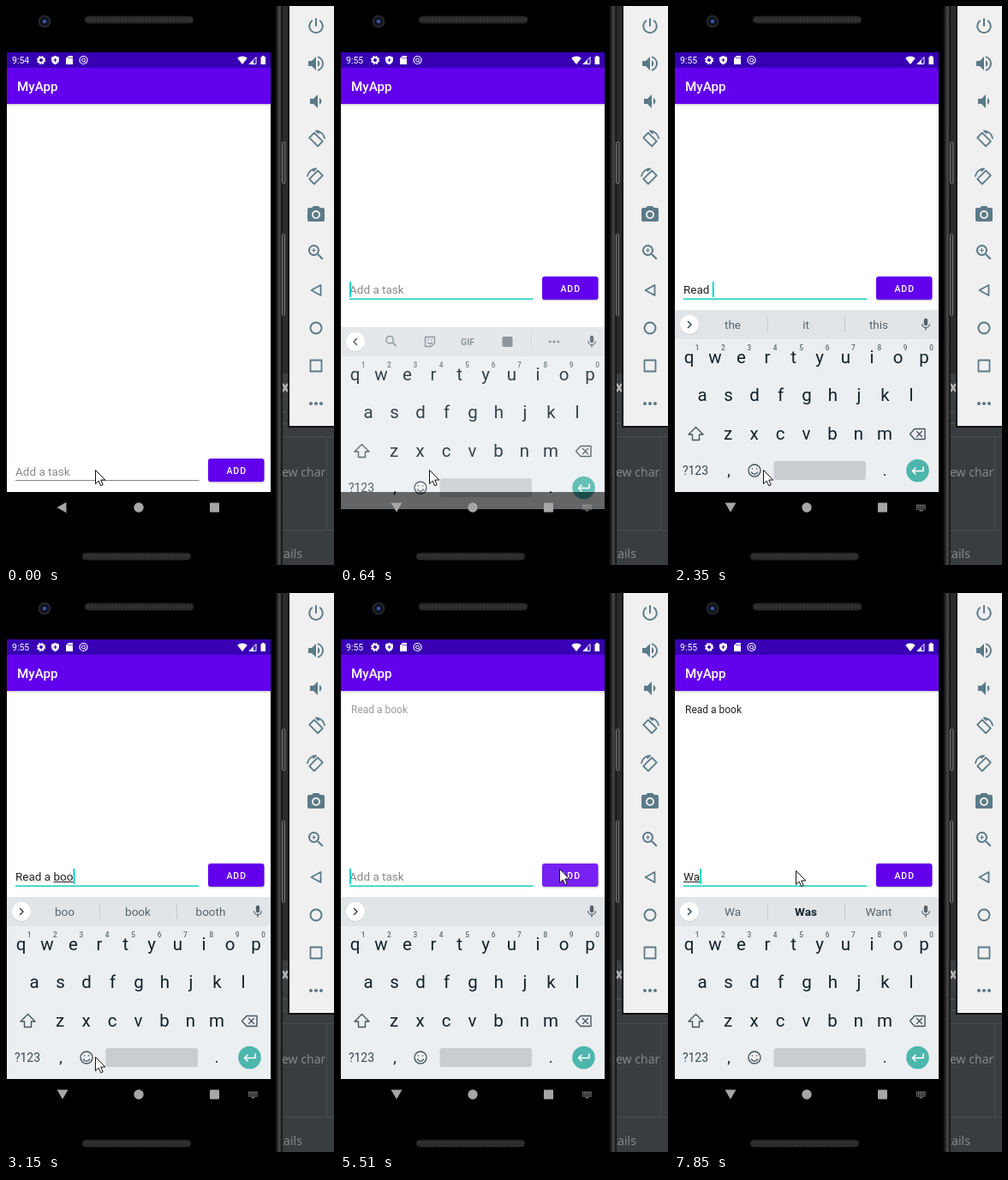
Write an HTML page that moves like this. It is 383 by 651 pixels and loops after 8000 ms.

```html
<!DOCTYPE html>
<html lang="en">
<head>
<meta charset="utf-8">
<title>Task list</title>
<style>
html, body { margin: 0; width: 100%; height: 100%; overflow: hidden; background: #000; }
svg { display: block; width: 383px; height: 651px; }
text { font-family: Roboto, sans-serif; white-space: pre; }
.mid { text-anchor: middle; }
.line { fill: none; stroke-linecap: round; stroke-linejoin: round; }
</style>
</head>
<body>
<svg id="stage" viewBox="0 0 383 651" xmlns="http://www.w3.org/2000/svg">
  <defs>
    <linearGradient id="edge">
      <stop offset="0" stop-color="#000"/><stop offset=".3" stop-color="#222"/>
      <stop offset=".6" stop-color="#4a4a4a"/><stop offset=".8" stop-color="#2a2a2a"/><stop offset="1" stop-color="#080808"/>
    </linearGradient>
    <linearGradient id="drop" x2="0" y2="1">
      <stop offset="0" stop-color="#000" stop-opacity=".2"/><stop offset="1" stop-color="#000" stop-opacity="0"/>
    </linearGradient>
    <pattern id="mesh" width="4" height="4" patternUnits="userSpaceOnUse">
      <rect width="4" height="4" fill="#303030"/><circle cx="2" cy="2" r="1" fill="#202020"/>
    </pattern>
    <clipPath id="screen"><rect x="1" y="54" width="308" height="548"/></clipPath>
  </defs>

  <!-- editor window behind the phone -->
  <rect width="383" height="651" fill="#2b2b2b"/>
  <rect x="316" y="428" width="15" height="34" fill="#3c3f41"/>
  <rect x="316" y="462" width="67" height="189" fill="#3a3d3f"/>
  <path d="M316 501.500H383M316 610.500H383M374.500 501V610" stroke="#4b4e50" fill="none"/>
  <path d="M323 440l6 9M329 440l-6 9" stroke="#b4b4b4" stroke-width="2.500"/>
  <path d="M323 473h5M323 486h5" stroke="#565a5c"/>
  <g fill="#85898b" font-size="14">
    <text x="322" y="548" style="font-family:'Noto Sans',sans-serif">ew char</text>
    <text x="319" y="643" style="font-family:'Noto Sans',sans-serif">tails</text>
  </g>

  <!-- phone body -->
  <rect width="317" height="651" fill="#000"/>
  <rect x="314" width="9" height="651" fill="url(#edge)"/>
  <g fill="#333" stroke="#777"><rect x="322.500" y="158.500" width="3.500" height="48" rx="1"/><rect x="322.500" y="265.500" width="3" height="95" rx="1"/></g>
  <rect x="92" y="12" width="127" height="8" rx="4" fill="url(#mesh)" stroke="#1c1c1c"/>
  <rect x="89" y="637" width="127" height="8" rx="4" fill="url(#mesh)" stroke="#1c1c1c"/>
  <circle cx="45" cy="18" r="7.500" fill="#22242a"/><circle cx="45" cy="18" r="5" fill="#10131c"/><circle cx="45" cy="18" r="2.300" fill="#3c54a0"/>

  <!-- emulator tools -->
  <rect x="329" width="54" height="491" fill="#111"/>
  <rect x="331" width="52" height="489" fill="#f0f0f0"/>
  <g id="tools" fill="#5b7a88"></g>

  <g clip-path="url(#screen)">
    <rect x="1" y="54" width="308" height="512" fill="#fff"/>
    <text id="item" x="13" y="140" font-size="12" fill="#212121">Read a book</text>
    <rect x="1" y="114" width="308" height="3" fill="url(#drop)"/>
    <rect x="1" y="54" width="308" height="18" fill="#3700b3"/>
    <rect x="1" y="72" width="308" height="42" fill="#6200ee"/>
    <text x="13" y="98.500" font-size="15.200" font-weight="500" fill="#fff">MyApp</text>
    <g fill="#fff">
      <text id="clock" x="7" y="67" font-size="10.500"></text>
      <circle cx="41" cy="63" r="3" fill="none" stroke="#fff" stroke-width="2"/>
      <circle cx="41" cy="63" r="4.400" fill="none" stroke="#fff" stroke-width="1.400" stroke-dasharray="2 1.460"/>
      <path d="M57.500 58l4.500 1.800v3c0 2.600-2 4.600-4.500 5.400c-2.500-.8-4.500-2.800-4.500-5.400v-3z"/>
      <path d="M55.500 63h4M57.500 61v4" stroke="#3700b3"/>
      <path d="M73 58h5v10h-8v-7z"/><path d="M73 59.500v2M75 59.500v2M77 59.500v2" stroke="#3700b3" stroke-width=".8"/>
      <circle cx="90.500" cy="63" r="4.500" fill="none" stroke="#fff" stroke-width="1.200"/>
      <circle cx="90.500" cy="63" r="2" fill="none" stroke="#fff"/><path d="M91 64l3 3" stroke="#fff"/>
      <path d="M276 68l-5.800-7.300a9 9 0 0 1 11.600 0z"/>
      <path d="M284 67.500l8-8v8z" fill="none" stroke="#fff"/><path d="M284 68l5-5v5z"/>
      <path d="M299 58h2.500v1.200h1.500V68h-5.500V59.200h1.500z"/>
    </g>

    <g id="entry">
      <rect id="rule" x="11" width="214.500"/>
      <text id="hint" x="11" y="547" font-size="13.500" fill="#8a8a8a">Add a task</text>
      <text id="typed" x="11" y="547" font-size="13.500" fill="#212121"></text>
      <rect id="compose" y="548" height="1" fill="#212121"/>
      <rect id="caret" y="533" width="2" height="18" fill="#03dac5"/>
      <rect x="236" y="528.500" width="66" height="27" rx="3" fill="#000" opacity=".18"/>
      <rect x="236" y="527" width="65.500" height="27" rx="3" id="button"/>
      <text class="mid" x="269.200" y="544.600" font-size="10.500" font-weight="500" letter-spacing=".95" fill="#fff">ADD</text>
    </g>

    <rect x="1" y="566" width="308" height="36" fill="#000"/>
    <g id="keyboard">
      <rect x="1" y="354" width="308" height="212" fill="#eceff1"/>
      <rect x="1" y="354" width="308" height="34" fill="#e1e5e8"/>
      <circle cx="18" cy="371.800" r="11.300" fill="#c9ced1"/><circle cx="18" cy="371" r="11" fill="#fff"/>
      <path id="chevron" class="line" stroke="#37474f" stroke-width="1.500"/>
      <g id="mic" fill="#546069"></g>
      <g id="shortcuts" fill="#7b868c"></g>
      <g id="words" font-size="13.500" fill="#56636a">
        <path d="M109.500 362v18M199.500 362v18" stroke="#c6cbce"/>
        <text class="mid" x="68.500" y="376"></text><text class="mid" x="154" y="376"></text><text class="mid" x="239" y="376"></text>
      </g>
      <g id="keys" fill="#11212a"></g>
      <g class="line" stroke="#46545c" stroke-width="1.400">
        <path d="M25.500 490.500l8.500 8.500h-4.500v6.500h-8V499h-4.500z"/>
        <path d="M281 492.500h12v12h-12l-5.500-6zM283.500 495.500l6 6M289.500 495.500l-6 6"/>
        <circle cx="94" cy="541" r="7"/><path d="M90.500 543a3.800 3.800 0 0 0 7 0M91.500 538.700v.2M96.500 538.700v.2" />
      </g>
      <rect x="116.500" y="530" width="107.500" height="22" rx="3" fill="#c9cdd0"/>
      <circle cx="284.500" cy="541" r="13.300" fill="#4db6ac"/>
      <path class="line" d="M291 537v4.500H278.500M282 538l-3.500 3.500 3.500 3.500" stroke="#fff" stroke-width="1.600"/>
    </g>
    <rect id="scrim" x="1" y="566" width="308" height="36" fill="#000"/>
    <g fill="#a6a6a6">
      <path id="back"/><circle cx="155" cy="584" r="5.700"/><rect x="238" y="578.500" width="11" height="11" rx=".8"/>
      <g id="imeIcon"><path d="M283 581.500h11M283 583.700h11M283 585.900h11" stroke="#a6a6a6" stroke-width="1.300" stroke-dasharray="1.300 .6"/><path d="M286.500 587.800h4" stroke="#a6a6a6"/></g>
    </g>
  </g>
  <path id="pointer" d="M.5 .5V16.500L4.200 13 6.700 18.700 9.200 17.600 6.800 12H11.800Z" fill="#fff" stroke="#111" stroke-linejoin="round"/>
</svg>
<script>
const $ = id => document.getElementById(id);
const set = (id, attrs) => { for (const k in attrs) $(id).setAttribute(k, attrs[k]); };
const show = (id, on) => { $(id).style.display = on ? '' : 'none'; };

const SPEAKER = 'v6h4l5 5V4L';
const LENS = 'M15.500 14h-.79l-.28-.27A6.500 6.500 0 1 0 13.730 14.430l.27.280v.79l5 4.990L20.490 19zM9.500 14a4.500 4.500 0 1 1 0-9a4.500 4.500 0 0 1 0 9z';
const MIC = 'M12 14a3 3 0 0 0 3-3V5a3 3 0 0 0-6 0v6a3 3 0 0 0 3 3zm5.300-3a5.300 5.100 0 0 1-10.600 0H5c0 3.410 2.720 6.230 6 6.720V21h2v-3.280c3.280-.48 6-3.300 6-6.720z';
const dots = 'M6 10a2 2 0 1 0 .01 0zM12 10a2 2 0 1 0 .01 0zM18 10a2 2 0 1 0 .01 0z';
const icon = (x, y, scale, body) =>
  `<g transform="translate(${x} ${y}) scale(${scale}) translate(-12 -12)">${body}</g>`;
const solid = d => `<path d="${d}"/>`;
const outline = (d, extra = '') => `<path class="line" stroke="#5b7a88" stroke-width="1.800" d="${d}" ${extra}/>`;

const rotated = outline('M5 8.500h14v8H5z', 'transform="rotate(45 12 12.500)"') + outline('M12 2.500c5 0 9 3.500 10 8.500M12 2.500l3 2.500');
const mirrored = `<g transform="translate(24 0) scale(-1 1)">${rotated}</g>`;
const tools = [
  outline('M12 4v8M7.200 6.200a7.800 7.800 0 1 0 9.600 0', 'style="stroke-width:2"'),
  solid(`M3 9${SPEAKER}7 9zM14 8a4.500 4.500 0 0 1 0 8zM14 3.230v2.060a7 7 0 0 1 0 13.420v2.060a9 9 0 0 0 0-17.540z`),
  solid(`M5 9${SPEAKER}9 9zM16 8a4.500 4.500 0 0 1 0 8z`),
  rotated, mirrored,
  solid('M9 2L7.170 4H4a2 2 0 0 0-2 2v12a2 2 0 0 0 2 2h16a2 2 0 0 0 2-2V6a2 2 0 0 0-2-2h-3.170L15 2zM12 17a5 5 0 1 1 0-10a5 5 0 0 1 0 10zM12 8.800a3.200 3.200 0 1 0 .01 0z'),
  solid(LENS + 'M12 10h-2v2H9v-2H7V9h2V7h1v2h2z'),
  outline('M17.500 6v12L6.500 12z'),
  outline('M12 5.500a6.500 6.500 0 1 0 .01 0z'),
  outline('M5.500 5.500h13v13h-13z'),
  solid(dots)
];
$('tools').innerHTML = tools.map((body, i) => icon(362, 23 + 44 * i, 1, body)).join('');
$('mic').innerHTML = icon(294, 371, .72, solid(MIC));
$('shortcuts').innerHTML =
  icon(60, 370.5, .75, solid(LENS)) +
  '<path class="line" stroke="#7b868c" stroke-width="1.400" d="M99.500 365.500h11v7l-4 4h-7zM102.500 372q2.500 2.500 5 0M103 368.500v.5M107 368.500v.5"/>' +
  '<text class="mid" x="149" y="374.500" font-size="10.500" font-weight="700">GIF</text>' +
  '<rect x="189.500" y="365" width="12" height="12" rx="1.500"/>' +
  '<path d="M223.500 362v18" stroke="#d0d5d8"/>' + icon(250, 371, .8, solid(dots));

const label = (s, x, y, size, extra = '') => `<text class="mid" x="${x}" y="${y}" font-size="${size}" ${extra}>${s}</text>`;
const row = (letters, x, y) => [...letters].map((c, i) => label(c, x + 30.5 * i, y, 20.5)).join('');
$('keys').innerHTML =
  row('qwertyuiop', 17.5, 416) + row('asdfghjkl', 33, 460) + row('zxcvbnm', 63, 504.5) +
  [...'1234567890'].map((c, i) => label(c, 27 + 30.4 * i, 401, 8.3, 'fill="#5d6a71" font-weight="500"')).join('') +
  label('?123', 25, 546, 14, 'fill="#37474f"') + label(',', 64, 547, 18) + label('.', 246, 547, 18);

// Each entry changes part of the state and holds until the next change.
const say = (text, compose, ...words) => ({ text, compose, words, caret: true });
const timeline = [
  [0, { clock: '9:54', focus: false, caret: false, text: '', compose: 0, words: null, bar: true, slide: null, item: 0, button: '#6200ee', mouse: [104, 540] }],
  [120, { clock: '9:55', focus: true, caret: true }],
  [400, { slide: 110, fade: .25, scrim: .8 }],
  [520, { slide: 54, fade: .55, scrim: .5 }],
  [640, { slide: 20, fade: .85, scrim: .5 }],
  [760, { slide: 4, fade: 1, scrim: .8, caret: false }],
  [880, { slide: 0, scrim: 1 }],
  [1270, { caret: true }],
  [1550, { ...say('R', 1, 'R', 'I', 'Really'), bar: false }],
  [1840, say('Rea', 3, 'Rea', 'Read', 'Really')],
  [2100, say('Read', 4, 'Read', 'Reads', 'Reading')],
  [2350, say('Read ', 0, 'the', 'it', 'this')],
  [2610, say('Read a', 0, 'a', 'and', 'about')],
  [2760, say('Read a b', 1, 'b', 'book', 'but')],
  [3030, say('Read a bo', 2, 'bo', 'book', 'both')],
  [3150, say('Read a boo', 3, 'boo', 'book', 'booth')],
  [3400, say('Read a book', 4, 'book', 'booking', 'look')],
  [3930, { caret: false }],
  [4350, { mouse: [170, 430] }],
  [4470, { mouse: [273, 264], caret: true }],
  [4590, { mouse: [263, 287] }],
  [4710, { mouse: [256, 307] }],
  [4860, { mouse: [256, 315] }],
  [4980, { mouse: [256, 321], caret: false }],
  [5240, { button: '#6c14ef' }],
  [5390, { ...say('', 0), words: null, item: .1, button: '#7722f1' }],
  [5510, { item: .45 }],
  [5630, { item: 1, bar: true, button: '#6200ee' }],
  [5910, { caret: false }],
  [6190, { mouse: [143, 323] }],
  [6340, { mouse: [142, 323] }],
  [6460, { caret: true }],
  [6890, { caret: false }],
  [7480, { ...say('W', 1, 'W', 'We', 'What'), bar: false }],
  [7850, say('Wa', 2, 'Wa', 'Was', 'Want')]
];

const ctx = document.createElement('canvas').getContext('2d');
const widthOf = s => { ctx.font = '13.5px Roboto, sans-serif'; return ctx.measureText(s).width; };
const wordLabels = [...$('words').querySelectorAll('text')];

function render(t) {
  const s = {};
  for (const [start, change] of timeline) if (start <= t) Object.assign(s, change);
  const open = s.slide !== null;

  $('clock').textContent = s.clock;
  set('item', { opacity: s.item });
  set('entry', { transform: `translate(0 ${open ? -212 : 0})` });
  set('rule', s.focus ? { y: 552.5, height: 1.5, fill: '#18cdbb' } : { y: 552, height: 1, fill: '#858585' });
  set('button', { fill: s.button });

  const end = 11 + widthOf(s.text);
  const wordStart = 11 + widthOf(s.text.slice(0, s.text.length - s.compose));
  $('typed').textContent = s.text;
  show('hint', !s.text);
  set('compose', { x: wordStart, width: end - wordStart });
  set('caret', { x: end });
  show('caret', s.caret);

  show('keyboard', open);
  show('scrim', open);
  show('imeIcon', open);
  set('back', { d: open ? 'M59.500 578.500h13L66 589.500z' : 'M70.500 577.800v12.400L59.500 584z' });
  if (open) {
    set('keyboard', { transform: `translate(0 ${s.slide})`, opacity: s.fade });
    set('scrim', { opacity: s.scrim });
  }
  set('chevron', { d: s.bar ? 'M19.500 367.500l-3.500 3.500 3.500 3.500' : 'M16.500 367.500l3.500 3.500-3.500 3.500' });
  show('shortcuts', s.bar);
  show('words', s.words);
  if (s.words) wordLabels.forEach((el, i) => {
    const bold = s.words[i] === 'Was';
    el.textContent = s.words[i];
    el.setAttribute('font-weight', bold ? 700 : 400);
    el.setAttribute('fill', bold ? '#11212a' : '#56636a');
  });
  set('pointer', { transform: `translate(${s.mouse})` });
}

const begin = performance.now();
function tick() {
  render((performance.now() - begin) % 8000);
  requestAnimationFrame(tick);
}
tick();
</script>
</body>
</html>
```
